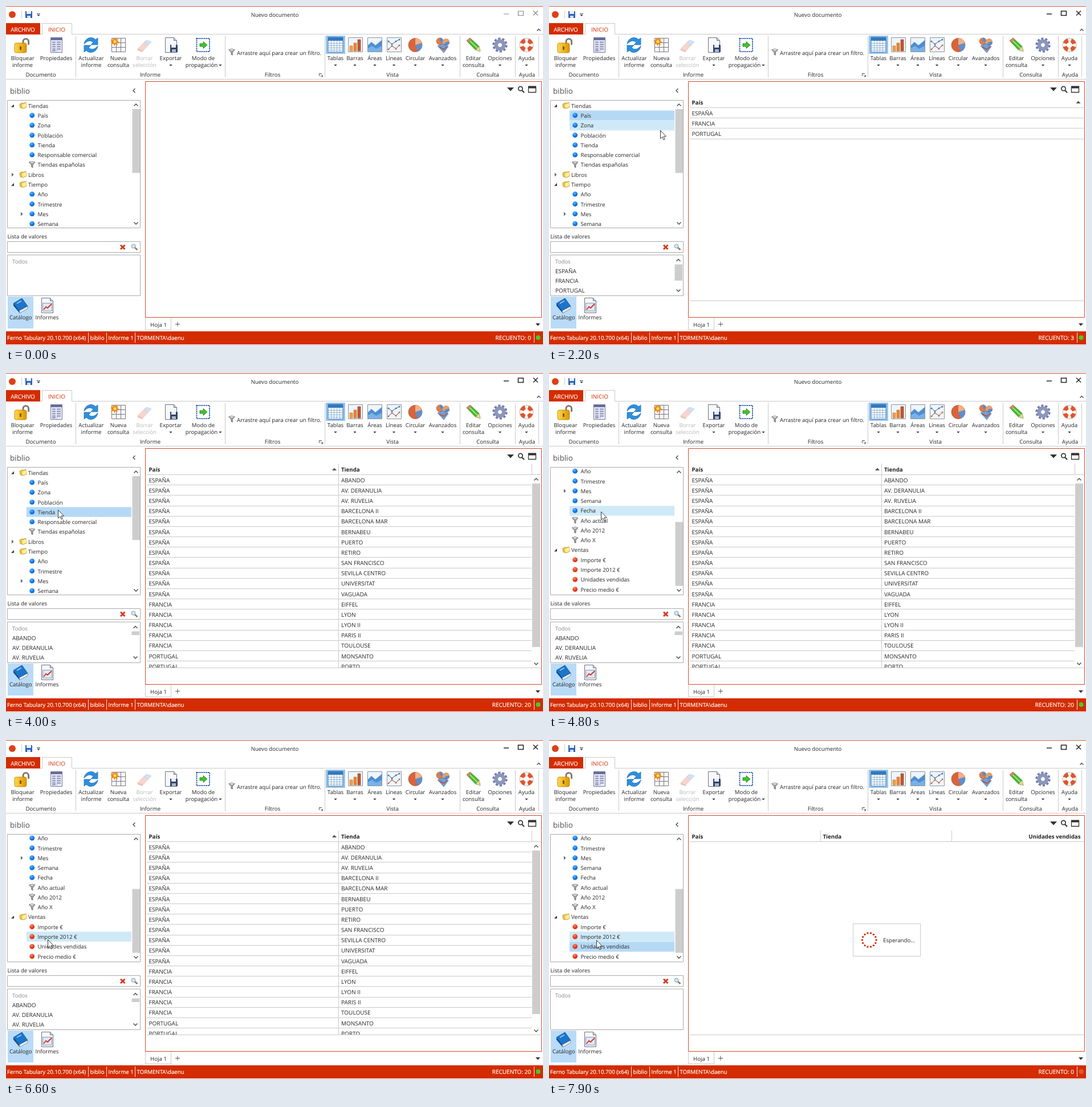
These frames come from a looping animation (942 px wide and 595 px high, 8000 ms). An HTML page:

```html
<!DOCTYPE html>
<html lang="es">
<head>
<meta charset="utf-8">
<title>Nuevo documento</title>
<style>
  html, body { margin: 0; width: 100%; height: 100%; overflow: hidden; background: #fff; }
  svg { display: block; width: 942px; height: 595px; }
  text { font: 9.7px "Open Sans", "Noto Sans", sans-serif; fill: #262626; text-rendering: geometricPrecision; white-space: pre; }
  .caps { font-size: 10px; }
  .bold { font-weight: 700; fill: #222; }
  .mid { text-anchor: middle; }
  .end { text-anchor: end; }
  .white { fill: #fff; stroke: #fff; stroke-width: .2; }
  .dim { fill: #b8b8b8; }
  .todos { fill: #888; }
  .line { fill: none; stroke: #c9c9c9; }
  .box { fill: #fff; stroke: #a9a9a9; }
  .chev { fill: none; stroke: #444; stroke-width: 1.3; }
  .ink { fill: #333; }
</style>
</head>
<body>
<svg viewBox="0 0 942 595">
  <defs>
    <radialGradient id="blue" cx=".4" cy=".3"><stop offset="0" stop-color="#5cb8ff"/><stop offset="1" stop-color="#0a6fe0"/></radialGradient>
    <radialGradient id="red" cx=".4" cy=".3"><stop offset="0" stop-color="#ff8a66"/><stop offset="1" stop-color="#e03414"/></radialGradient>
    <linearGradient id="gold" x2="1"><stop offset="0" stop-color="#ffd94a"/><stop offset="1" stop-color="#dc9500"/></linearGradient>
    <clipPath id="treeClip"><path d="M3 166H220V389H3Z"/></clipPath>
    <clipPath id="rowClip"><path d="M246 179H938V517H246Z"/></clipPath>
    <g id="blueDot"><circle r="4.4" fill="url(#blue)"/></g>
    <g id="redDot"><circle r="4.4" fill="url(#red)"/></g>
    <g id="funnel"><path d="M-5.2-4.3Q0-6.6 5.2-4.3L1.3.5V5.2L-1 4V.5Z" fill="#a5a5a5" stroke="#5a5a5a" stroke-width=".8"/><path d="M-4-4.2Q0-5.6 4-4.2L0-2.8Z" fill="#f4f4f4"/></g>
    <g id="folder"><path d="M-6-2.5L-1.5-4.8 0-4 5-5.5 6 3 0 5.3-5 4Z" fill="#efc33f" stroke="#a98520" stroke-width=".7"/><path d="M-2-1.5L5.5-4.5 5.5 2.5-.8 4.8Z" fill="#fff0a0"/></g>
    <g id="sheetIcon"><path d="M0 0H15L20 5V26H0Z" fill="#f7f8fb" stroke="#6b6f7c"/><path d="M15 0V5H20" fill="#c9d0dc" stroke="#6b6f7c"/></g>
    <path id="tile" d="M.5.5H25.5V25.5H.5Z" fill="#eef5fc" stroke="#8b929c"/>
    <path id="drop" class="ink" d="M-2.7-1.3H2.7L0 1.6Z"/>
    <path id="winMarks" fill="none" d="M873 14H882M898.5 9H907.5V16.5H898.5ZM925 8.500L933 16.500M933 8.500L925 16.500"/>
  </defs>

  <!-- title bar and tabs -->
  <path d="M0 .5H942" stroke="#d9532f"/>
  <circle cx="11" cy="15" r="6" fill="#dd4016"/>
  <path class="line" d="M27.5 8V21"/>
  <path d="M34 9H45L46 10V21H34Z" fill="#2a62b8"/><path d="M36 9H44V14H36Z" fill="#eaf1fb"/><path d="M37 17H43V21H37Z" fill="#d4dcea"/>
  <path d="M54 13.5H60" stroke="#444"/><use href="#drop" x="57" y="16.5"/>
  <text class="mid" x="471.5" y="19">Nuevo documento</text>
  <use id="winActive" href="#winMarks" stroke="#222" stroke-width="1.5"/>
  <use id="winIdle" href="#winMarks" stroke="#888" stroke-width="1.2"/>
  <path class="line" d="M0 49.5H63.5V30.5H115.5V49.5H942M0 128.5H942"/>
  <path d="M0 30H60V50H0Z" fill="#d32c00"/>
  <text class="mid white caps" x="29.5" y="45">ARCHIVO</text>
  <text class="mid caps" x="89" y="45" style="fill:#d32c00">INICIO</text>
  <path class="chev" d="M931.5 43.5L934.5 40.5 937.5 43.5"/>
  <path class="line" d="M122.5 53V125M384.5 53V125M559.5 53V125M796.5 53V125M893.5 53V125M934.5 53V125"/>

  <!-- ribbon icons -->
  <path d="M30 67V62.5A4.8 4.8 0 0 1 39.6 62.5V68" fill="none" stroke="#77736a" stroke-width="2.8"/>
  <rect x="15" y="65" width="21" height="17" rx="3" fill="url(#gold)" stroke="#b98200" stroke-width=".8"/><path d="M24 71H27V77H24Z" fill="#7a5a10"/>
  <path d="M78.5 55.5H98.5V81.5H78.5Z" fill="#e9eaf6" stroke="#7479a4"/><path d="M79 56H98V60H79Z" fill="#686d9b"/>
  <path d="M81 63.5H96M81 67.5H96M81 71.5H96M81 75.5H96M81 78.5H90" stroke="#878cb5" stroke-width="2" stroke-dasharray="6 2 9"/>
  <g fill="#2d8fdf" stroke="#1766ad" stroke-width=".7"><path id="swirl" d="M137 67C138 56 151 52 157 59L161 56V68H149L153 64C148 59 142 61 137 67Z"/><use href="#swirl" transform="rotate(180 149 68.5)"/></g>
  <path d="M185.5 56.5H209.5V80.5H185.5ZM185.5 64.5H209.5M185.5 72.5H209.5M193.5 56.5V80.5M201.5 56.5V80.5" fill="#fbfbfd" stroke="#77747c"/>
  <path d="M191 55L193 59 197 57.5 195.5 61.5 199 63.5 195 65 196 69 192 67 190 70.5 188.5 66.5 184 67.5 186 63.5 183 61 187 60 187 56 190 58.5Z" fill="#f08a18"/><circle cx="191" cy="62.5" r="2.5" fill="#ffe066"/>
  <g opacity=".55" stroke-width=".7"><path d="M231 75L245 61 253 65 240 79Z" fill="#f2b3a6" stroke="#d28d80"/><path d="M242 64L247 60 255 63 249 69Z" fill="#a8cdf0" stroke="#7ba6cf"/><path d="M231 75L240 79V81L231 78Z" fill="#d28d80"/></g>
  <use href="#sheetIcon" x="279.5" y="55.5"/>
  <path d="M288 68H300L301 69V81H288Z" fill="#32436b"/><path d="M290 68H298V73H290Z" fill="#e8edf6"/><path d="M291 76H298V81H291Z" fill="#aab6cc"/>
  <path d="M334.5 57H357V80H334.5Z" fill="#fff" stroke="#1b50b0" stroke-width="2" stroke-dasharray="2 1.3"/>
  <path d="M340 66H346V62.5L353 68.5 346 74.5V71H340Z" fill="#43c22c" stroke="#1f7c12" stroke-width=".8"/>
  <use href="#funnel" x="396" y="81"/>
  <path d="M549.5 123V118.5H554M552 120.5L555 123.5M555.5 121V124H552.5" fill="none" stroke="#555"/>

  <path d="M561 52H595V84H561Z" fill="#95c7ef"/>
  <path d="M565 55H591V81H565Z" fill="#fff" stroke="#3f6fa8"/><path d="M565 55H591V61H565Z" fill="#3578bd"/>
  <path d="M565 65.5H591M565 69.5H591M565 73.5H591M565 77.5H591M570.5 61V81M575.5 61V81M580.5 61V81M585.5 61V81" stroke="#7ca6cf" stroke-width=".8"/>
  <use href="#tile" x="600" y="55"/><path d="M603 70H608V79H603Z" fill="#f0a04b" stroke="#b56a1c" stroke-width=".6"/><path d="M610 65H615V79H610Z" fill="#e98632" stroke="#b56a1c" stroke-width=".6"/><path d="M617 59H622V79H617Z" fill="#c5552f" stroke="#8d3518" stroke-width=".6"/>
  <use href="#tile" x="634" y="55"/><path d="M635 80V69L641 63 648 69 659 60V80Z" fill="#4e8ed3"/><path d="M635 80V74L642 70 649 75 659 70V80Z" fill="#79b2e8"/>
  <use href="#tile" x="668" y="55"/><path d="M671 62L677 67 684 62 690 59M671 76L677 70 684 75 690 69" fill="none" stroke="#444" stroke-width=".9"/>
  <g fill="none" stroke-width="3" stroke-linecap="round"><path d="M671 62h0M677 67h0M684 62h0M690 59h0" stroke="#3e78c2"/><path d="M671 76h0M677 70h0M684 75h0M690 69h0" stroke="#d8622c"/></g>
  <circle cx="718" cy="68.5" r="12" fill="#d8643c" stroke="#a8482a" stroke-width=".7"/><path d="M718 68.5V56.5A12 12 0 0 1 729.5 65Z" fill="#f0b184"/><path d="M718 68.5L729.5 65A12 12 0 0 1 722 80Z" fill="#5e8fd0"/>
  <circle cx="761" cy="62" r="6.5" fill="#de7d4a"/><path d="M761 62V55.5A6.5 6.5 0 0 1 767 64Z" fill="#5b8bcc"/><circle cx="772" cy="63" r="6" fill="#e4a06a"/><path d="M772 63L778 63A6 6 0 0 1 768 68Z" fill="#5b8bcc"/>
  <path d="M757 70L766 66 776 71 768 82Z" fill="#6f9fd9" stroke="#456fa5" stroke-width=".7"/><path d="M760 72L768 76 774 71" fill="none" stroke="#c24a2d" stroke-width="1.6"/>

  <path d="M808 61L814 56 830 71 832 79.5 824 77.5Z" fill="#4db52d" stroke="#2c7e18" stroke-width=".8"/><path d="M811 58.5L827 74" stroke="#9ee67c" stroke-width="2"/><path d="M830 71L832 79.5 824 77.5Z" fill="#f0cf9a"/><path d="M808 61L814 56 816.5 58.5 811 63.5Z" fill="#e57a6c"/>
  <circle cx="866.5" cy="68.5" r="11.3" fill="none" stroke="#707baa" stroke-width="3.6" stroke-dasharray="4.1 3"/><circle cx="866.5" cy="68.5" r="7.2" fill="none" stroke="#8c96bd" stroke-width="6"/><circle cx="866.5" cy="68.5" r="4" fill="#fff" stroke="#5b668f" stroke-width=".8"/>
  <circle cx="913" cy="68.5" r="8.5" fill="none" stroke="#f4f1ee" stroke-width="7"/><circle cx="913" cy="68.5" r="8.5" fill="none" stroke="#e2532b" stroke-width="7" stroke-dasharray="8 5.35" stroke-dashoffset="-2.7"/><circle cx="913" cy="68.5" r="12.2" fill="none" stroke="#b9a299" stroke-width=".7"/>
  <g id="ribbon"></g>
  <text x="405" y="86">Arrastre aquí para crear un filtro.</text>

  <!-- side panel -->
  <text x="7" y="154" style="font-size:13.5px;fill:#505050">biblio</text>
  <path class="chev" d="M226.5 145L223 148.5 226.5 152"/>
  <path class="box" d="M2.5 165.5H235.5V389.5H2.5Z"/>
  <g clip-path="url(#treeClip)"><g id="tree">
    <rect id="sel" x="36" width="200" y="-8.7" height="17.3" fill="#b5d9f5"/>
    <rect id="hover" y="-8.7" width="240" height="17.3" fill="#cfe9f7"/>
    <g id="rows"></g>
  </g></g>
  <path d="M221 166H235V389H221Z" fill="#fff"/>
  <rect id="thumb" x="221.5" y="181" width="13.5" height="112" fill="#cdcdcd"/>
  <path class="chev" d="M224.5 175.5L228 172 231.5 175.5M224.5 379.5L228 383 231.5 379.5"/>
  <text x="2.5" y="408.3">Lista de valores</text>
  <path class="box" d="M2.5 413.5H235.5V432.5H2.5Z"/>
  <path d="M201 419.5L208.5 427M208.5 419.5L201 427" stroke="#cf3c24" stroke-width="3"/>
  <path d="M225.5 423.5L230.5 428" stroke="#9a7045" stroke-width="2.4"/><circle cx="223.5" cy="421.5" r="3.5" fill="#cfe8fb" stroke="#6fa0c8"/>
  <path class="box" d="M2.5 437H235.5V508.5H2.5Z"/>
  <text class="todos" x="11" y="451.5">Todos</text>
  <g id="values1"></g>
  <g id="values2"></g>
  <path d="M3 510H48V566H3Z" fill="#b9dbf8"/>
  <path d="M13 522L28 513 38 527 23 535Z" fill="#1b75cb" stroke="#0d4c8c" stroke-width=".8"/><path d="M23 535L38 527V531L24 539Z" fill="#eef3f8" stroke="#456" stroke-width=".6"/><path d="M13 522L23 535 24 539 13 526Z" fill="#0d4c8c"/><path d="M19 522L27 517.5" stroke="#9fd0fa" stroke-width="1.5"/>
  <text class="mid" x="25.8" y="550">Catálogo</text>
  <use href="#sheetIcon" x="62.5" y="512.5"/>
  <path d="M64.5 521.5H80.5V535.5H64.5Z" fill="#dfe8f5" stroke="#6b7fa8" stroke-width=".8"/><path d="M66 533L70 528 73 530 80 523" fill="none" stroke="#d3301c" stroke-width="1.8"/>
  <text class="mid" x="72" y="550">Informes</text>

  <!-- sheet -->
  <path d="M244.5 132.5H939.5V546.5H244.5Z" fill="#fff" stroke="#d2492c"/>
  <path class="ink" d="M879 143H891L885 149.5Z"/>
  <circle cx="902.5" cy="145" r="3.7" fill="none" stroke="#333" stroke-width="1.7"/><path d="M905 148L909 152" stroke="#333" stroke-width="2.2"/>
  <path d="M916.5 141.5H929.5V151.5H916.5Z" fill="none" stroke="#333" stroke-width="1.3"/><path class="ink" d="M916 140.5H930V144.5H916Z"/>
  <g id="table1"></g>
  <g id="wait2"></g>
  <g id="table2"></g>
  <g id="wait3"></g>
  <path class="line" d="M244.5 547V568.5H289.5V547"/>
  <text class="mid" x="267.5" y="562.5">Hoja 1</text>
  <path d="M297 558.5H305M301 554.5V562.5" stroke="#555"/>
  <path class="ink" d="M929 557H937L933 561.5Z"/>

  <!-- status bar -->
  <path d="M0 571H942V594H0Z" fill="#d32c00"/>
  <g id="status"></g>
  <path d="M144.5 573V591M176.5 573V591M226.5 573V591M926.5 573V591" stroke="#fbe3dc"/>
  <circle cx="933.5" cy="582" r="4" fill="#3fd023"/>
  <circle id="busy" cx="933.5" cy="582" r="4" fill="#e8512c"/>

  <path id="cursor" d="M.5.5V14.8L3.8 11.7 6 16.8 8.2 15.9 6 10.9H10.5Z" fill="#fff" stroke="#222" stroke-width=".9"/>
</svg>

<script>
const $ = id => document.getElementById(id);
const put = (id, html) => { $(id).innerHTML = html; };
const text = (x, y, s, cls = "") => `<text x="${x}" y="${y}" class="${cls}">${s}</text>`;
const line = d => `<path class="line" d="${d}"/>`;
const use = (id, x, y) => `<use href="#${id}" x="${x}" y="${y}"/>`;

// ribbon: x, first line, second line ("" draws an arrow)
put("ribbon", [
  [29, "Bloquear", "informe"], [88, "Propiedades"], [149.5, "Actualizar", "informe"],
  [197, "Nueva", "consulta"], [243, "Borrar", "selección", "dim"], [289, "Exportar", ""],
  [346, "Modo de"], [578, "Tablas", ""], [612, "Barras", ""], [647, "Áreas", ""],
  [680.5, "Líneas", ""], [718, "Circular", ""], [766, "Avanzados", ""],
  [820, "Editar", "consulta"], [866.5, "Opciones", ""], [913, "Ayuda", ""]
].map(([x, a, b, cls = ""]) => text(x, 95, a, "mid " + cls) +
  (b ? text(x, 107, b, "mid " + cls) : b === "" ? use("drop", x, 104) : "")).join("") +
  text(343, 107, "propagación", "mid") + use("drop", 376, 104) +
  [[61, "Documento"], [253, "Informe"], [467.5, "Filtros"], [678, "Vista"], [845, "Consulta"], [914, "Ayuda"]]
    .map(([x, s]) => text(x, 123.7, s, "mid")).join(""));

// tree: "v" open folder, ">" closed folder, "b" field, "r" measure, "f" filter, "m" field with arrow
const PITCH = 17.28, rowY = i => 175 + PITCH * i;
const openMark = y => `<path class="ink" d="M14 ${y - 2.5}V${y + 2.5}H9Z"/>`;
const shutMark = (x, y) => `<path d="M${x} ${y - 3.5}L${x + 3.5} ${y}L${x} ${y + 3.5}Z" fill="#666"/>`;
put("rows", `vTiendas|bPaís|bZona|bPoblación|bTienda|bResponsable comercial|fTiendas españolas|>Libros|vTiempo|bAño|bTrimestre|mMes|bSemana|bFecha|fAño actual|fAño 2012|fAño X|vVentas|rImporte €|rImporte 2012 €|rUnidades vendidas|rPrecio medio €`
  .split("|").map((s, i) => {
    const kind = s[0], y = rowY(i), top = "v>".includes(kind);
    const icon = top ? "folder" : { f: "funnel", r: "redDot" }[kind] || "blueDot";
    const mark = kind === "v" ? openMark(y) : kind === ">" ? shutMark(10, y) : kind === "m" ? shutMark(26, y) : "";
    return mark + use(icon, top ? 30 : 45.7, y - .3) + text(top ? 39 : 55.5, y + 3.7, s.slice(1));
  }).join(""));

const values = (names, h) => names.map((s, i) => text(11, 468.5 + 17.3 * i, s, "caps")).join("") +
  `<rect x="220.5" y="453.5" width="13.5" height="${h}" fill="#cdcdcd"/>` +
  `<path class="chev" d="M223.5 448L227 444.5 230.5 448M223.5 497.5L227 501 230.5 497.5"/>`;
const countries = ["ESPAÑA", "FRANCIA", "PORTUGAL"];
const shops = "ABANDO|AV. DERANULIA|AV. RUVELIA|BARCELONA II|BARCELONA MAR|BERNABEU|PUERTO|RETIRO|SAN FRANCISCO|SEVILLA CENTRO|UNIVERSITAT|VAGUADA|EIFFEL|LYON|LYON II|PARIS II|TOULOUSE|MONSANTO|PORTO".split("|");
put("values1", values(countries, 28.5));
put("values2", values(shops.slice(0, 3), 6.5));

// result grids
const STEP = 18.17;
const head = (x, s, cls = "") => text(x, 172.8, s, "bold " + cls);
const sort = x => `<path d="M${x - 4} 171H${x + 4}L${x} 166.5Z" fill="#555"/>`;
const frame = line("M247 178.5H938M247 517.5H938");
const cells = (x, list) => list.map((s, i) => text(x, 191.7 + STEP * i, s, "caps")).join("");
const rules = (n, right) => Array.from({ length: n }, (_, i) => line(`M247 ${178.5 + Math.round(STEP * (i + 1))}H${right}`)).join("");
const dots = Array.from({ length: 14 }, (_, i) => {
  const a = i * Math.PI / 7;
  return `<circle cx="${561.7 + 12.3 * Math.cos(a)}" cy="${351 + 12.3 * Math.sin(a)}" r="1.7" fill="#d32c00"/>`;
}).join("");
const waiting = `<path d="M533.5 322.5H651.5V379.5H533.5Z" fill="#fff" stroke="#c9c9c9"/>` + dots + text(586, 355.3, "Esperando...");

put("table1", frame + head(250.5, "País") + sort(928.5) + rules(3, 938) + cells(250.5, countries));
put("wait2", frame + head(250.5, "País") + head(596, "Tienda") + line("M592.5 159V178") + waiting);
put("table2", frame + head(250.5, "País") + sort(576) + head(588, "Tienda") +
  line("M583.5 159V517M922.5 159V178") +
  `<g clip-path="url(#rowClip)">` + rules(18, 922) +
  cells(250.5, shops.map((_, i) => countries[i < 12 ? 0 : i < 17 ? 1 : 2])) + cells(588, shops) + `</g>` +
  `<path d="M923 194H937V481H923Z" fill="#cdcdcd"/><path class="chev" d="M926.5 188.5L930 185 933.5 188.5M926.5 508.5L930 512 933.5 508.5"/>`);
put("wait3", frame + head(250.5, "País") + head(480.5, "Tienda") + head(932.5, "Unidades vendidas", "end") +
  line("M476.5 159V178M706.5 159V178") + waiting);

const count = (id, n) => `<g id="${id}">${text(921, 586, "RECUENTO: " + n, "white caps end")}</g>`;
put("status", text(2, 586, "Ferno Tabulary 20.10.700 (x64)", "white") + text(147.5, 586, "biblio", "white") +
  text(179.5, 586, "Informe 1", "white") + text(229.5, 586, "TORMENTA\\daenu", "white") +
  count("count0", 0) + count("count3", 3) + count("count20", 20));

// timeline
const LOOP = 8000;
const css = [];
const track = (id, keys) => css.push(
  `@keyframes ${id}{${keys.map(([ms, rule]) => `${ms * 100 / LOOP}%{${rule}}`).join("")}}` +
  `#${id}{animation:${id} ${LOOP}ms step-end -30ms infinite}`);
const show = (id, ...spans) => {
  const keys = spans[0][0] ? [[0, "visibility:hidden"]] : [];
  for (const [a, b] of spans) {
    keys.push([a, "visibility:visible"]);
    if (b < LOOP) keys.push([b, "visibility:hidden"]);
  }
  track(id, keys);
};
const slide = (id, keys) => track(id, keys.map(([ms, y]) => [ms, `transform:translateY(${y}px)`]));

show("winIdle", [0, 1100]);
show("winActive", [1100, LOOP]);
show("values1", [1100, 3300]);
show("values2", [3300, 7000]);
show("table1", [2000, 3400]);
show("wait2", [3400, 4000]);
show("table2", [4000, 7400]);
show("wait3", [7400, LOOP]);
show("busy", [3400, 4000], [7400, LOOP]);
show("count0", [0, 2000], [3400, 4000], [7400, LOOP]);
show("count3", [2000, 3400]);
show("count20", [4000, 7400]);

slide("tree", [[0, 0], [4400, -52.7], [4500, -105.4], [4600, -158]]);
slide("thumb", [[0, 0], [4400, 26.7], [4500, 53.4], [4600, 80.5]]);
slide("sel", [[0, -99], [1100, rowY(1)], [3300, rowY(4)], [7000, rowY(20)]]);

const folders = [0, 7, 8, 17], none = -20;
track("hover", [
  [0, none], [800, 0], [900, 1], [1100, none], [2000, 2], [2300, 3], [3000, 4], [3300, none],
  [4400, 7], [4500, 10], [4600, 13], [4900, 14], [5100, 15], [5200, 16], [5400, 17], [5500, 18],
  [6400, 19], [6800, 20], [7000, none], [7800, 19]
].map(([ms, i]) => [ms, `transform:translate(${folders.includes(i) ? 20 : 36}px,${rowY(i)}px)`]));

// pointer moves: start, number of 100 ms steps, x, y
let pos = [20, -17];
const at = ease => `transform:translate(${pos[0]}px,${pos[1]}px);animation-timing-function:${ease}`;
const path = [[0, at("step-end")]];
for (const [ms, n, x, y] of [
  [200, 4, 40, 130], [600, 4, 52, 189], [1500, 4, 120, 196], [2000, 3, 195, 218], [2300, 5, 105, 228],
  [2900, 3, 91, 240], [4800, 1, 91, 243], [4900, 8, 80, 332], [6400, 3, 73, 350], [6800, 1, 73, 358],
  [7700, 3, 83, 351]
]) {
  path.push([ms, at(`steps(${n},start)`)]);
  pos = [x, y];
  path.push([ms + 100 * n, at("step-end")]);
}
track("cursor", path);

document.head.appendChild(document.createElement("style")).textContent = css.join("\n");
</script>
</body>
</html>
```
